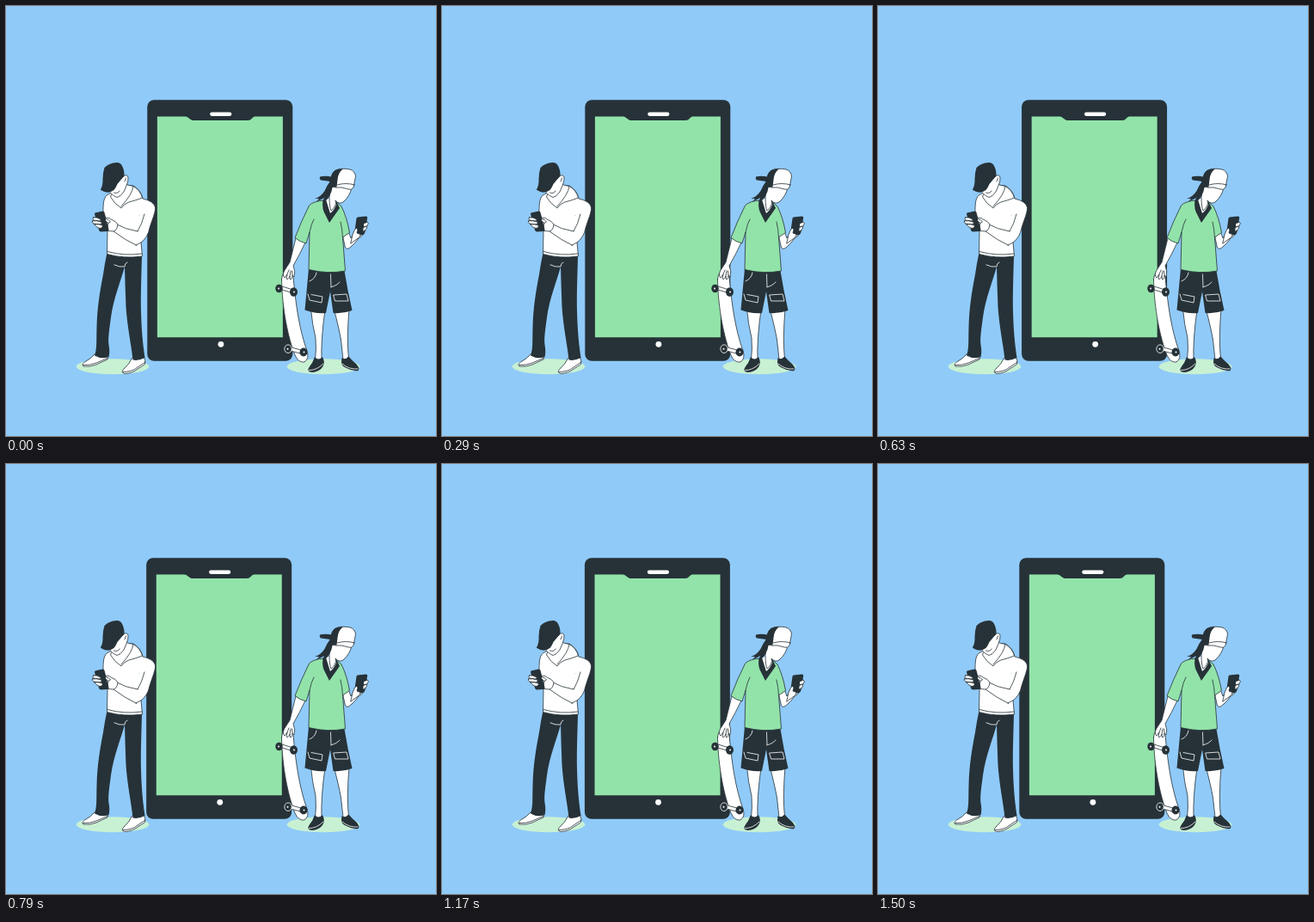
An HTML page for the animation above (1540 ms loop, 500x500 px).

```html
<!DOCTYPE html>
<html lang="en">
<head>
<meta charset="utf-8">
<title>Two friends and a shaking phone</title>
<style>
  html, body { margin: 0; width: 100%; height: 100%; overflow: hidden; background: #90caf9; }
  svg { display: block; width: 100vw; height: 100vh; }
  .d { fill: #263238; }
  .g { fill: #92e3a9; }
  .w { fill: #fff; }
  .o { stroke: #263238; stroke-width: .8; stroke-linejoin: round; stroke-linecap: round; }
  .l { fill: none; stroke: #263238; stroke-width: .8; stroke-linecap: round; stroke-linejoin: round; }
  .p { fill: none; stroke: #fff; stroke-width: .8; stroke-linecap: round; stroke-linejoin: round; }
</style>
</head>
<body>
<svg viewBox="0 0 500 500">
  <rect width="500" height="500" fill="#90caf9"/>
  <g fill="#c8f1d3">
    <ellipse cx="124" cy="419.3" rx="42.3" ry="9"/>
    <ellipse cx="369" cy="419.3" rx="42.3" ry="9"/>
  </g>

  <g id="phone">
    <rect class="d" x="164.3" y="109.2" width="169" height="303.6" rx="8"/>
    <path class="g" d="M175.9 128.5H208.7Q210.700 128.600 212.100 130T216.700 133H281.200Q284.200 133 286.200 130.500T290.200 128.500H321.900V385.200H175.900Z"/>
    <rect class="w" x="237.200" y="123.600" width="25.200" height="4.300" rx="2.150"/>
    <circle class="w" cx="249.900" cy="393.300" r="3.400"/>
  </g>

  <g id="reader">
    <path class="w o" d="M103 405Q99 410 91.500 414Q87.500 417 90 419Q97 420 105 417Q111 414 118 411L119 404Z"/>
    <path class="w o" d="M147 409Q143 417 136.500 422.500Q133.500 426.500 138 427.500Q147 427 153 422Q158 419 161.500 416.500Q162.500 413 160.500 408Z"/>
    <path class="l" d="M90 417.500Q98 418 105 415L118 409.500M136 425.500Q147 425.500 153 420L162 414"/>
    <path class="d" d="M117.500 287L158 290.500C157.500 312 156.500 335 157 355C157.500 376 159 393 161.500 409Q154 413 147.500 411.500C146 396 141 373 139.500 350Q138.500 325 138 303C134 318 125 340 122 362C120 377 118.500 387 119.500 394Q121 402 119.500 408Q111 411 103 406.500C106 399 105 388 105.500 374C106 351 109 333 113 312Q115 298 117.500 287Z"/>
    <path class="p" d="M126 301Q132 304 138 303Q138 299 141 298"/>

    <path class="w o" d="M119 219C113 221 113 231 113 240Q114 246 120 253L118 262L117.500 288.500Q137 294 158.500 291L157 275Q165 269 167 258C170 248 174 240 173.500 234Q172 227 159 224Q157 214 148 209L139 209Z"/>
    <path class="w o" d="M139 207Q143 209 148 209.500Q156 214 158.500 223Q151 226 143 228Q137 230 134 235Q126 230 121.500 222Q121 219 126 217Z"/>
    <path class="l" d="M148 209.500Q147 219 134 233"/>
    <path class="w o" d="M119 213Q121 219 129 222.500Q133 222 137 216L140 209Q142.500 203 142 199Q140 194.500 136 199L128 207Z"/>
    <path class="l" d="M125.500 217Q130 219 132 215M139.500 200L138 204"/>
    <path class="d" d="M109.800 213.800Q113 208 112.500 201Q112.500 194 114.500 188Q120 182.500 129 182Q132.500 182 134.500 185Q137.500 190 137.600 197Q133 203 129.500 207Q128 211 125.500 214Q118.500 219.500 109.800 213.800Z"/>

    <path class="l" d="M155 244Q151 254 153 262M157 275L151 278M118 285.500Q137 291 158 288"/>
    <path class="w o" d="M127 253Q139 260 153 262Q158 254 161 242M152 278.500Q138 272 125 262"/>
    <path class="w o" d="M114 247Q119 245 122 248Q128 250 130 254Q129 261 125 262Q116 262 112 258Z"/>
    <path class="w o" d="M102 246Q107 245 112 248L119 252L118 258Q108 257 103 254Z"/>
    <path class="d" d="M103.500 240.500L112.500 238.500Q114 238.500 114.500 240L119.500 260Q120 262 118 262L110 262.500Q108.500 262 108 260.500L103 242Z"/>
    <path class="w o" d="M101.500 246Q105 245 110 248Q111 250 108 250L102 249Q99.500 247 101.500 246ZM100.500 250Q106 249 111 251Q112 253.500 109 254L102 253Q99 252 100.500 250ZM103 254Q108 253 112 255Q113 258 109 258.500Q104 257 103 254Z"/>
    <path class="w o" d="M115.500 247.500Q120 248 121.500 251L119 252.500L116 250Z"/>
  </g>

  <g id="skater">
    <path class="w o" d="M320.500 318Q321 307 330 307Q334 309 334.500 320C337 347 341 376 350 401Q353 410 347 414Q340 415 336 406C328 386 321 352 320.500 318Z"/>
    <path class="l" d="M318 328L335 332.500M328 399L346 402" stroke-width="2"/>
    <path class="w o" d="M321 326L332 329.500L331 333L321 330ZM332 397L343 400L342 404L331 401Z"/>
    <g class="d">
      <ellipse cx="317.500" cy="328.500" rx="4.200" ry="4.800"/>
      <ellipse cx="334.500" cy="332.500" rx="4.500" ry="5.200"/>
      <ellipse cx="328" cy="398.700" rx="4.200" ry="4.800" stroke="#fff" stroke-width=".8"/>
      <ellipse cx="346" cy="402.500" rx="4.500" ry="5"/>
    </g>
    <g class="w">
      <circle cx="317" cy="328.500" r="1"/><circle cx="335" cy="332.500" r="1"/>
      <circle cx="327.500" cy="398.700" r="1"/><circle cx="346.500" cy="402.500" r="1"/>
    </g>

    <path class="w o" d="M354.500 352Q356 370 360 386Q361 399 359.500 412L367 413Q366 388 371 353Z"/>
    <path class="w o" d="M381.500 353Q387 374 389.500 388L392 411L398.500 411Q396 387 399 352Z"/>
    <path class="d" d="M359 408Q363 413 368 408Q371 414 369 418Q367 423 361 425Q353 427.500 351 423.500Q352 420 356 415Z"/>
    <path class="d" d="M390.500 409Q394 412 398.500 407.500Q402 412 407 416Q412 421 409.500 424Q403 425 396 421Q390 419 390 414Z"/>
    <path class="p" d="M352 423.500Q361 424 369 416M391 416Q399 423 409 422"/>
    <path class="d" d="M352 305L393.500 308Q397 330 402.500 354Q392 358 380.500 357L377 332L372 357Q359 358 347.500 353.500Q350 327 352 305Z"/>
    <path class="p" d="M377.500 312L378 326M361 310Q360 317 353 320M377.500 327Q385 325 388 321M351 335L353 342L367 345L368 338L355 335.500M381 336L396 335L398 343L383 343Z"/>

    <path class="w o" d="M337 270Q333 286 330 298L323.500 308Q321 314 324 316L327 312L326 317Q328 319 330 314L330.500 318Q333 318 333 313L335 315Q337 309 334 302Q341 290 349 273Z"/>
    <path class="l" d="M327 312L329 307M330 314L331 308M333 313L332.500 308"/>
    <path class="w o" d="M391 265L394.500 281Q397 284 401 280Q406 276 410 270Q417 266 418.500 259Q422 253 419 250Q414 252 411 257Q405 263 401 270L398 262Z"/>
    <path class="g o" d="M370 226Q357 227 352.500 232Q343 251 336 269.500Q341 274 349 276L353 263L352 306.500Q374 312 394.500 308L391.500 269L399.500 263.500Q396.500 246 390 233L382 226Z"/>
    <path class="l" d="M353 263Q355 253 358 248M391.500 269Q391 259 389 251"/>
    <path class="d" d="M369 225Q367 232 369.500 239L376 252L388 235L384 227L377 240L373 226Z"/>
    <path class="w" d="M372 225L377 241Q382 237 384 231L383 222Z"/>

    <path class="w o" d="M378 208L376 222Q376 234 378 238Q382 236 383.500 230L383 226Q387 231 392 228Q400 221 402 211L392 203Z"/>
    <path class="d" d="M378 202Q373 209 370.500 215Q366 222 359 224L364 224L361 227.500Q367 225 370 223L368 228Q374 226 376 221Q379 216 380 209Z"/>
    <path class="d" d="M365 198.500Q371 197 378.500 198.500L382 205Q373 203 366 202.500Q364 201 365 198.500Z"/>
    <path class="w o" d="M378 206Q377 196 383 191Q390 188 400 190Q406 192 406.500 198L404 211Q402 214.500 398 213Q390 210 383 211Z"/>
    <path class="d" d="M377.500 206Q376.500 196 382 191.500Q387 189 392 189.200Q386 194 385.500 202L384.500 210.500L379 211Z"/>
    <path class="l" d="M385 208Q395 205 405.500 208"/>
    <path class="d" d="M409 245.500L418.500 244.500Q420.500 244.500 420.200 246.500L417 264Q416.500 266 414.500 266.300L406.500 267.300Q404.500 267.200 405 265L407.500 247Q407.800 245.700 409 245.500Z"/>
    <path class="w o" d="M403 266L405.500 260Q408 257 409 260L408 264L412 265.500Q413 268 408 271L401 276Z"/>
    <path class="w o" d="M416 253Q421 250 421.500 253Q421 256 416 257.500ZM415.500 257Q419.500 255 419.500 258Q419 261 415 262Z"/>
  </g>
</svg>
<script>
  const LOOP = 1540, STEP = 1000 / 24, LAST = 36;
  const phone = document.getElementById("phone");

  // percent of the shake, sideways shift
  const keys = [[0, 0], [10, -1], [20, 2], [30, -4], [40, 4], [50, -4],
                [60, 4], [70, -4], [80, 2], [90, -1], [100, 0]];

  const bez = (a, b, u) => 3 * a * u * (1 - u) ** 2 + 3 * b * u * u * (1 - u) + u ** 3;

  // cubic-bezier(.25, .1, .25, 1)
  function ease(x) {
    let lo = 0, hi = 1;
    for (let i = 0; i < 24; i++) {
      const mid = (lo + hi) / 2;
      if (bez(.25, .25, mid) < x) lo = mid; else hi = mid;
    }
    return bez(.1, 1, lo);
  }

  function shift(pct) {
    const i = Math.min(9, Math.floor(pct / 10));
    const [p, a] = keys[i], b = keys[i + 1][1];
    return a + (b - a) * ease((pct - p) / 10);
  }

  function draw(ms) {
    const k = Math.min(LAST, Math.floor((ms % LOOP + 4) / STEP));
    phone.setAttribute("transform", `translate(${shift(.4 + 2.73 * k).toFixed(3)} 0)`);
  }

  let start;
  function tick(now) {
    start ??= now;
    draw(now - start);
    requestAnimationFrame(tick);
  }
  draw(0);
  requestAnimationFrame(tick);
</script>
</body>
</html>
```
